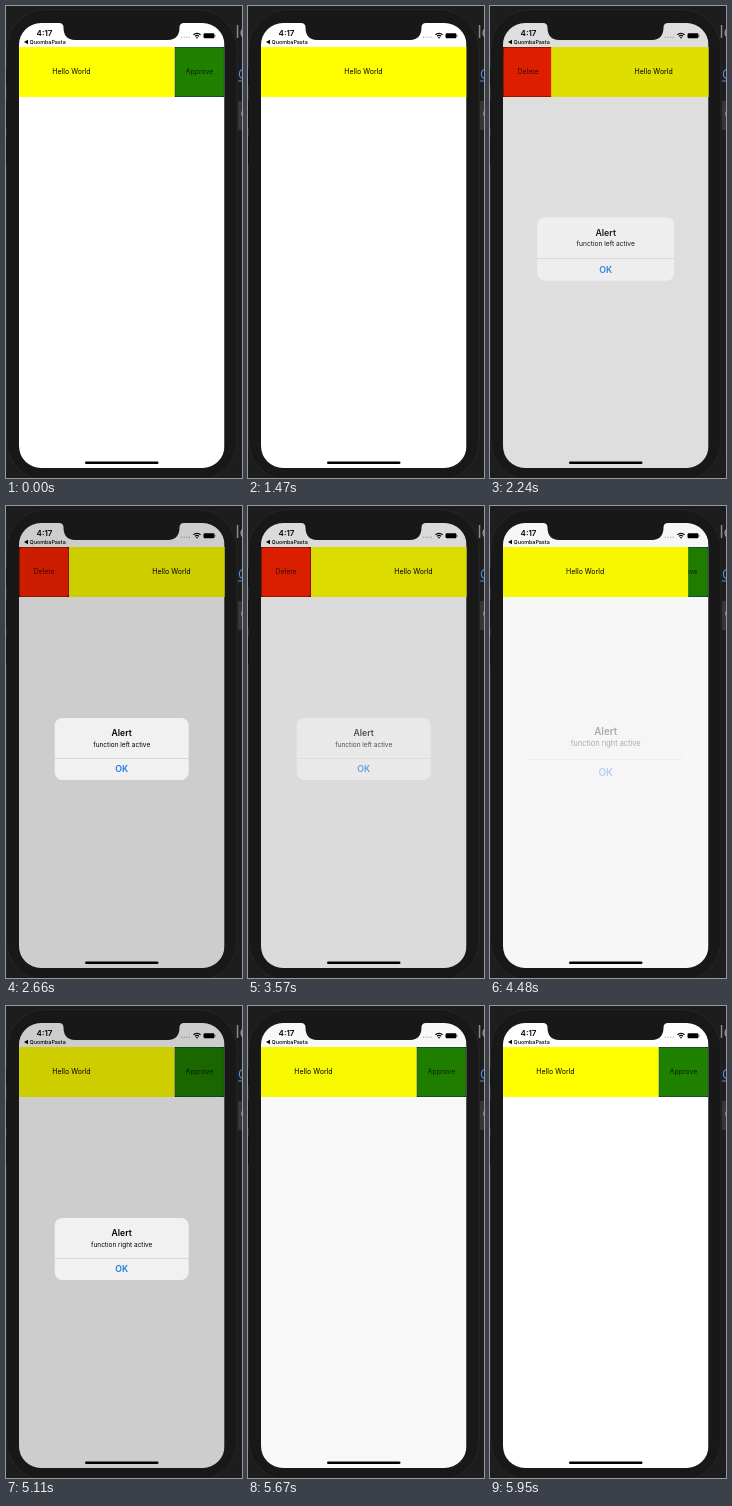
Recreate the animation shown at these times as an HTML page with a canvas. Size 236 by 472 pixels, loop 6.16 s.

```html
<!DOCTYPE html>
<html lang="en">
<head>
<meta charset="utf-8">
<title>Swipeable row</title>
<style>
html, body { margin: 0; width: 100%; height: 100%; overflow: hidden; background: #1e1d1d; }
canvas { display: block; width: 236px; height: 472px; }
</style>
</head>
<body>
<canvas id="stage" width="236" height="472"></canvas>
<script>
const ctx = document.getElementById('stage').getContext('2d');
const LOOP = 6160, STEP = 70;
const SCREEN = { x: 13, y: 17, w: 205.5, h: 445 };
const ROW = { y: 41, h: 50, action: 50 };
const FONT = 'Inter, "Liberation Sans", sans-serif';

const swipes = [
  { at: 770, from: -50, to: 0 },
  { at: 1820, from: 0, to: 50 },
  { at: 4270, from: 50, to: -50 }
];
const alerts = [
  { open: 1960, close: 3500, message: 'function left active' },
  { open: 4410, close: 5390, message: 'function right active' }
];

const progress = (t, start, length) => Math.min(1, Math.max(0, (t - start) / length));
const easeOut = (u, power) => 1 - (1 - u) ** power;

function rowOffset(t) {
  let offset = swipes[0].from;
  for (const s of swipes) {
    if (t > s.at) offset = s.from + (s.to - s.from) * easeOut(progress(t, s.at, 630), 3);
  }
  return offset;
}

function alertState(t) {
  const current = alerts.find(a => t > a.open && t < a.close + 420);
  if (!current) return null;
  const u = progress(t, current.open, 420);
  const v = progress(t, current.close, 420);
  const shown = easeOut(u, 2);
  return {
    message: current.message,
    dim: 0.195 * u * (1 - v) ** 1.74,
    alpha: shown * Math.max(0, 1 - 2 * v),
    scale: 1.2 - 0.2 * shown
  };
}

function box(x, y, w, h, r, fill) {
  ctx.beginPath();
  ctx.roundRect(x, y, w, h, r);
  ctx.fillStyle = fill;
  ctx.fill();
}

function label(text, x, y, size, fill, weight = 400, align = 'center') {
  ctx.font = `${weight} ${size}px ${FONT}`;
  ctx.textAlign = align;
  ctx.fillStyle = fill;
  ctx.fillText(text, x, y);
}

function drawDesktop() {
  ctx.fillStyle = '#1e1d1d';
  ctx.fillRect(0, 0, 236, 472);
  label('le', 229.5, 32, 17, '#8b8b8b', 400, 'left');
  label('C', 232, 73, 13, '#4a8fdc', 400, 'left');
  ctx.fillRect(232, 74.5, 4, 1);
  ctx.fillStyle = '#363636';
  ctx.fillRect(232, 95, 4, 29);
  label('c', 234.5, 111, 12, '#909090', 400, 'left');
}

function drawPhone() {
  box(0.5, 3.5, 230.5, 471, 40, '#191818');
  ctx.strokeStyle = '#272626';
  ctx.lineWidth = 1;
  ctx.stroke();
  ctx.fillStyle = '#121212';
  for (const [y, h] of [[62, 18], [94, 28], [131, 28]]) ctx.fillRect(0, y, 1, h);
}

function clipScreen() {
  ctx.beginPath();
  ctx.roundRect(SCREEN.x, SCREEN.y, SCREEN.w, SCREEN.h, 22);
  ctx.clip();
}

function drawAction(x, fill, edge, text) {
  ctx.fillStyle = edge;
  ctx.fillRect(x, ROW.y, ROW.action, ROW.h);
  box(x + 0.6, ROW.y + 0.5, ROW.action - 1.2, ROW.h - 1, 2, fill);
  label(text, x + ROW.action / 2, 68.3, 7, 'rgba(0,0,0,.72)');
}

function drawRow(offset) {
  const right = SCREEN.x + SCREEN.w;
  if (offset < 0) drawAction(right - ROW.action, '#208000', '#102060', 'Approve');
  if (offset > 0) drawAction(SCREEN.x, '#fe2300', '#6a1000', 'Delete');
  ctx.fillStyle = '#ffff00';
  ctx.fillRect(SCREEN.x + offset, ROW.y, SCREEN.w, ROW.h);
  label('Hello World', 115.5 + offset, 68.3, 7, '#000');
}

function drawStatusBar() {
  label('4:17', 38.5, 29.6, 8, '#000', 600);
  ctx.beginPath();
  ctx.moveTo(18, 36);
  ctx.lineTo(22, 33.8);
  ctx.lineTo(22, 38.2);
  ctx.fill();
  label('QuombaPasta', 23.5, 38, 5.4, '#000', 500, 'left');

  for (let i = 0; i < 4; i++) box(175 + i * 2.5, 30.5, 1.4, 1.4, 0.7, '#b5b5b5');

  ctx.strokeStyle = '#000';
  ctx.lineWidth = 1.2;
  for (const r of [2.8, 5]) {
    ctx.beginPath();
    ctx.arc(191, 32.3, r, -Math.PI * 0.75, -Math.PI * 0.25);
    ctx.stroke();
  }
  ctx.beginPath();
  ctx.moveTo(191, 32.8);
  ctx.arc(191, 32.6, 1.6, -Math.PI * 0.75, -Math.PI * 0.25);
  ctx.fillStyle = '#000';
  ctx.fill();

  box(197.5, 27.3, 11, 5, 1.4, '#000');
  box(209, 28.9, 0.8, 1.8, 0.4, '#888');
}

function drawNotch() {
  ctx.beginPath();
  ctx.moveTo(53, 16);
  ctx.lineTo(53, 17);
  ctx.quadraticCurveTo(57.5, 17, 57.5, 21.5);
  ctx.bezierCurveTo(57.5, 29, 61, 34, 69, 34);
  ctx.lineTo(162, 34);
  ctx.bezierCurveTo(170, 34, 173.5, 29, 173.5, 21.5);
  ctx.quadraticCurveTo(173.5, 17, 178, 17);
  ctx.lineTo(178, 16);
  ctx.fillStyle = '#191818';
  ctx.fill();
}

function drawAlert({ message, alpha, scale }) {
  ctx.save();
  ctx.globalAlpha = alpha;
  ctx.translate(115.7, 243);
  ctx.scale(scale, scale);
  box(-67, -31, 134, 62, 7.5, '#f1f1f1');
  ctx.fillStyle = '#cfcfcf';
  ctx.fillRect(-67, 9, 134, 0.7);
  label('Alert', 0, -12.7, 8.6, '#000', 600);
  label(message, 0, -2.5, 6.5, '#000');
  label('OK', 0, 23.4, 8.7, '#1a7be4', 600);
  ctx.restore();
}

function draw(t) {
  const alert = alertState(t);
  drawDesktop();
  drawPhone();
  ctx.save();
  clipScreen();
  ctx.fillStyle = '#fff';
  ctx.fillRect(SCREEN.x, SCREEN.y, SCREEN.w, SCREEN.h);
  drawRow(rowOffset(t));
  drawStatusBar();
  if (alert) {
    ctx.fillStyle = `rgba(0,0,0,${alert.dim})`;
    ctx.fillRect(SCREEN.x, SCREEN.y, SCREEN.w, SCREEN.h);
    drawAlert(alert);
  }
  box(79, 455.4, 73.5, 2.6, 1.3, '#000');
  ctx.restore();
  drawNotch();
}

let start;
function tick(now) {
  start ??= now;
  const t = (now - start) % LOOP;
  draw(Math.floor(t / STEP) * STEP);
  requestAnimationFrame(tick);
}
draw(0);
requestAnimationFrame(tick);
</script>
</body>
</html>
```
